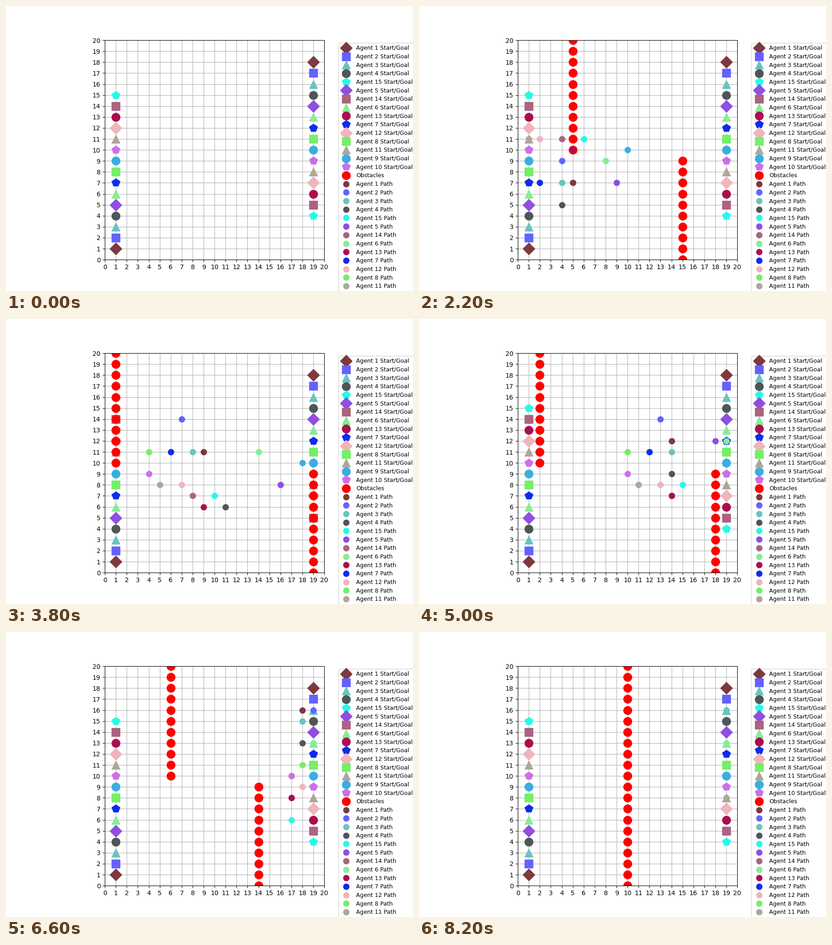
These frames come from a looping animation (894x626 px, 8400 ms). A matplotlib script:

```python
import matplotlib.pyplot as plt
import numpy as np
from matplotlib.animation import FuncAnimation

DPI = 100
FRAMES = 42
STEP_MS = 200
SIZE = 20
GATE = 10      # first row above the lower wall
MEET = 19      # step at which every agent is at its midway cell
MARKERS = "Ds^op"

# Agent number: colour and midway cell, in planning priority order
AGENTS = {
    1: ("#7d393e", (9, 11)),
    2: ("#6461ff", (7, 14)),
    3: ("#68c4c0", (8, 11)),
    4: ("#505658", (11, 6)),
    15: ("#25fae8", (10, 7)),
    5: ("#8f4fe0", (16, 8)),
    14: ("#ac6380", (8, 7)),
    6: ("#88ec93", (14, 11)),
    13: ("#ac0d50", (9, 6)),
    7: ("#0c2cee", (6, 11)),
    12: ("#efb5ba", (7, 8)),
    8: ("#75ef68", (4, 11)),
    11: ("#aea69a", (5, 8)),
    9: ("#3aaee0", (18, 10)),
    10: ("#cc6fe9", (4, 9)),
}


def upper_wall(k):
    return abs(SIZE // 2 - k // 2)


def lower_wall(k):
    return SIZE - upper_wall(k)


def approach(a, b, k):
    """Cell on the way from a to b, leaving just in time to arrive at MEET."""
    dx, dy = b[0] - a[0], b[1] - a[1]
    dist = abs(dx) + abs(dy)
    moved = max(0, dist - (MEET - k))
    mx = int(moved * abs(dx) / dist + 0.5)
    return a[0] + np.sign(dx) * mx, a[1] + np.sign(dy) * (moved - mx)


def advance(cell, goal, k):
    """One move towards the goal, climbing over the lower wall if it is near."""
    x, y = cell
    dx, dy = goal[0] - x, goal[1] - y
    gap = lower_wall(k) - x
    if y < GATE and 0 <= gap <= GATE - y + 1:
        return x, y + 1
    keep_row = gap >= 0 and dy < 0 and y <= GATE
    if dx and (dx >= abs(dy) or keep_row):
        return x + 1, y
    return x, y + np.sign(dy)


def route(agent, midway):
    cells = [approach((1, agent), midway, k) for k in range(MEET + 1)]
    for k in range(MEET, FRAMES - 1):
        cells.append(advance(cells[-1], (19, 19 - agent), k))
    return cells


fig, ax = plt.subplots(figsize=(8.94, 6.26), dpi=DPI)
ax.set(xlim=(0, SIZE), ylim=(0, SIZE), aspect="equal",
       xticks=range(SIZE + 1), yticks=range(SIZE + 1))
ax.grid(True)


def dots(x, y, color, label, size=13, marker="o"):
    return ax.plot(x, y, linestyle="none", marker=marker, color=color,
                   markersize=size, label=label)[0]


for n, (agent, (color, _)) in enumerate(AGENTS.items()):
    dots([1, 19], [agent, 19 - agent], color,
         f"Agent {agent} Start/Goal", marker=MARKERS[n % len(MARKERS)])
walls = dots([], [], "red", "Obstacles")
movers = [dots([], [], color, f"Agent {agent} Path", size=9)
          for agent, (color, _) in AGENTS.items()]
routes = [route(agent, midway) for agent, (_, midway) in AGENTS.items()]

ax.legend(loc="upper left", bbox_to_anchor=(1.05, 1), fontsize=9,
          labelspacing=0.454, handletextpad=0.74)


def update(k):
    rows = range(SIZE + 1) if k else []
    walls.set_data([upper_wall(k) if y >= GATE else lower_wall(k)
                    for y in rows], rows)
    for mover, cells in zip(movers, routes):
        x, y = cells[k]
        mover.set_data([x] if k else [], [y] if k else [])
    return [walls, *movers]


anim = FuncAnimation(fig, update, frames=FRAMES, interval=STEP_MS,
                     repeat=True, repeat_delay=0)
plt.show()
```
